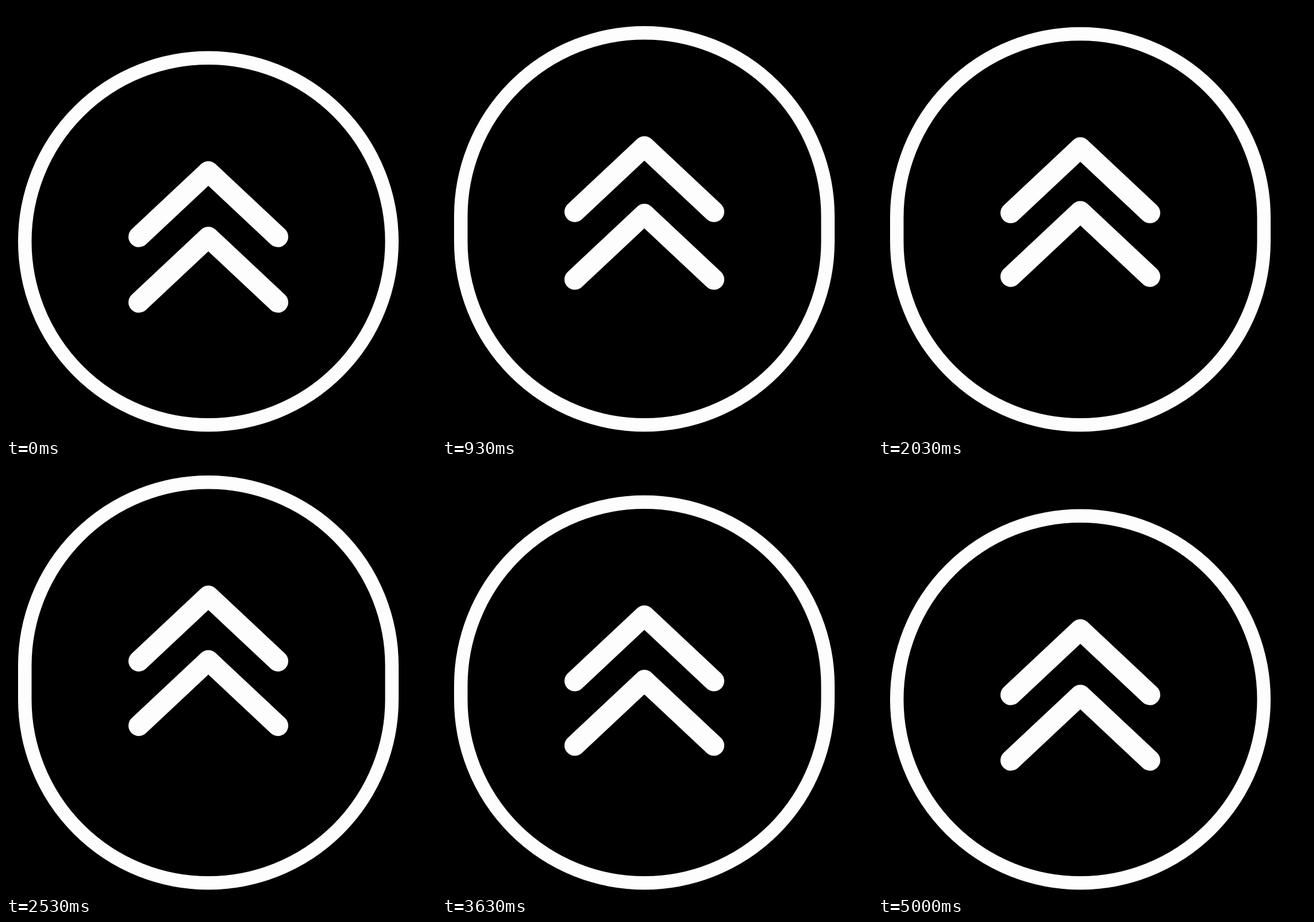
Animation, 748 px wide and 748 px high, one loop 5110 ms. Source, as an HTML page with a canvas:

```html
<!DOCTYPE html>
<html lang="en">
<head>
<meta charset="utf-8">
<title>Scroll up</title>
<style>
  html, body { margin: 0; width: 100%; height: 100%; overflow: hidden; background: #000; }
  canvas { display: block; width: 748px; height: 748px; }
</style>
</head>
<body>
<canvas id="stage" width="748" height="748"></canvas>
<script>
const ctx = document.getElementById('stage').getContext('2d');
const LOOP = 5110, CYCLE = 1700, PEAK = 700;
const CX = 352, RING_Y = 409.5, RING_R = 319.25, RING_W = 23.5;

// Cubic bezier easing with control points (.343, 0) and (.395, 1).
function ease(x) {
  if (x <= 0) return 0;
  if (x >= 1) return 1;
  let lo = 0, hi = 1, s = 0.5;
  for (let i = 0; i < 24; i++) {
    s = (lo + hi) / 2;
    const r = 1 - s;
    const bx = 3 * 0.343 * s * r * r + 3 * 0.395 * s * s * r + s * s * s;
    if (bx < x) lo = s; else hi = s;
  }
  return s * s * (3 - 2 * s);
}

// Rises until PEAK, then settles back by the given end time.
function lift(t, end) {
  return t < PEAK ? ease(t / PEAK) : 1 - ease((t - PEAK) / (end - PEAK));
}

function ring(rise) {
  ctx.lineWidth = RING_W;
  ctx.beginPath();
  ctx.arc(CX, RING_Y - rise, RING_R, Math.PI, 0);
  ctx.arc(CX, RING_Y, RING_R, 0, Math.PI);
  ctx.closePath();
  ctx.stroke();
}

function chevron(y) {
  ctx.lineWidth = 36;
  ctx.beginPath();
  ctx.moveTo(CX - 121, y + 113.5);
  ctx.lineTo(CX, y);
  ctx.lineTo(CX + 121, y + 113.5);
  ctx.stroke();
}

// Two uneven steps per 100 ms.
function step(t) {
  const base = Math.floor(t / 100) * 100;
  return base + (t - base >= 30 ? 100 / 3 : 0);
}

function draw(t) {
  const phase = step(t) % CYCLE;
  const rise = 65.8 * lift(phase, 1433);
  ctx.fillStyle = '#000';
  ctx.fillRect(0, 0, 748, 748);
  ctx.strokeStyle = '#fdfdfd';
  ctx.lineCap = ctx.lineJoin = 'round';
  ring(rise);
  chevron(288 - rise);
  chevron(402 - 70.8 * lift(phase, 1333));
}

const start = performance.now();
function tick() {
  draw((performance.now() - start) % LOOP);
  requestAnimationFrame(tick);
}
tick();
</script>
</body>
</html>
```
